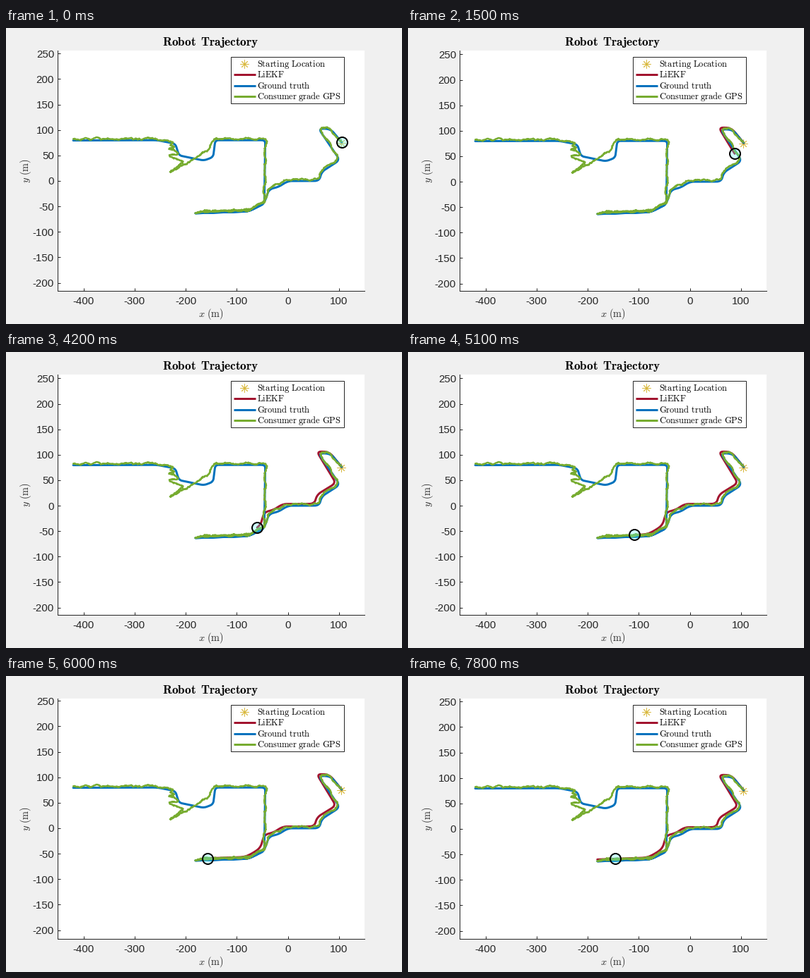
Recreate the animation shown at these times as a matplotlib script. Size 560x420 px, loop 8 s.

```python
import numpy as np
import matplotlib.pyplot as plt
from matplotlib.animation import FuncAnimation
from matplotlib.patches import Rectangle

W, H, DPI = 560, 420, 100
PT = 72 / DPI                       # points per pixel
SCALE, X0, Y0 = 0.7225, 398.5, 217  # pixels per metre, origin on the stage
LEFT, RIGHT, TOP, BOTTOM = 73, 507, 32, 373
INTERVAL, HOLD, POSES = 100, 3, 27  # each pose is held for three ticks
INK, RED, BLUE, GREEN, GOLD = "#262626", "#a2142f", "#0072bd", "#77ac30", "#d9b93f"

# Corners of the drive, in metres
OUT = [(105.5, 76), (84, 102), (60, 103), (102, 41), (66, 18), (62, 0), (0, 0),
       (-18, -12), (-37, -16), (-45, -42), (-62, -53), (-78, -60), (-181, -63.5)]
BACK = [OUT[-1], (-78, -60), (-46, -45), (-44, 80), (-142, 80)]
DIP = [(-146, 47), (-164, 40), (-213, 50), (-220, 73)]
HOME = [(-240, 77), (-256, 80), (-420, 79.5)]

# Where the robot is at a few poses
CHECKPOINTS = {0: OUT[0], 5: (92, 58), 10: (49, 0), 14: (-55, -50), 17: (-109, -54),
               20: (-158, -59), 22: OUT[-1], 23: OUT[-1], 26: (-147, -57)}


def travelled(p):
    return np.r_[0, np.cumsum(np.hypot(*np.diff(p, axis=0).T))]


def rounded(corners, radius):
    """Polyline with curved corners, sampled every metre."""
    p = np.array(corners, float)
    t = np.linspace(0, 1, 9)[:, None]
    parts = [p[:1]]
    for a, b, c in zip(p, p[1:], p[2:]):
        start, end = (b + (q - b) * min(radius / np.hypot(*(q - b)), 0.5) for q in (a, c))
        parts.append((1 - t) ** 2 * start + 2 * t * (1 - t) * b + t ** 2 * end)
    p = np.vstack(parts + [p[-1:]])
    d = travelled(p)
    s = np.linspace(0, d[-1], int(d[-1]) + 1)
    return np.column_stack([np.interp(s, d, p[:, 0]), np.interp(s, d, p[:, 1])])


def lost_signal(swings=8):
    """Dive off the road, then shrinking zigzags back up to it."""
    k = np.arange(swings)
    x = -232 + k % 2 * 32 * 0.84 ** k
    y = 13 + 60 * np.sqrt(k / (swings - 1))
    return [(-159, 54), *zip(x, y)]


def wander(n, seed=7):
    rng = np.random.default_rng(seed)
    slow = [np.convolve(rng.normal(0, 4, n), np.ones(12) / 12, "same") for _ in "xy"]
    return np.column_stack(slow) + rng.normal(0, 0.35, (n, 2))


out = rounded(OUT, 10)
truth = np.vstack([out, rounded(BACK + DIP + HOME, 7)])

gps = np.vstack([out, rounded(BACK + lost_signal() + HOME, 3)])
gps += wander(len(gps))
gps[:, 1] += 3 * np.clip(travelled(gps) / 150, 0, 1)

# The filter drifts sideways in mid-route and settles again at the turn
part = np.linspace(0, 1, len(out))
estimate = out + np.column_stack([-10 * np.sin(np.pi * part),
                                  3.5 * np.clip(part * 12, 0, 1)])

nearest = [np.hypot(*(estimate - p).T).argmin() for p in CHECKPOINTS.values()]
progress = np.interp(range(POSES), list(CHECKPOINTS), nearest).astype(int)


def view_shift(pose):
    """Vertical jump of the axes limits in pixels."""
    return 0 if pose < 2 else 1 if pose < 19 else -1 if pose < 25 else 0


plt.rcParams["font.family"] = "Liberation Sans"
fig = plt.figure(figsize=(W / DPI, H / DPI), dpi=DPI, facecolor="#f0f0f0")

ax = fig.add_axes([LEFT / W, 1 - BOTTOM / H, (RIGHT - LEFT) / W, (BOTTOM - TOP) / H])
ax.set_xlim((LEFT - X0) / SCALE, (RIGHT - X0) / SCALE)
ax.set_xticks(range(-400, 101, 100), [str(v) for v in range(-400, 101, 100)])
ax.set_yticks(range(-200, 251, 50), [str(v) for v in range(-200, 251, 50)])
ax.tick_params(direction="in", length=4 * PT, width=PT, color=INK,
               labelcolor=INK, labelsize=15 * PT)
ax.tick_params(axis="x", pad=8 * PT)
ax.tick_params(axis="y", pad=5 * PT)
ax.spines[["top", "right"]].set_visible(False)
ax.spines[["left", "bottom"]].set(color=INK, linewidth=PT)

star = dict(marker=(8, 2, 0), ms=12 * PT, mec=GOLD, mew=0.9 * PT, ls="none")
stroke = dict(solid_joinstyle="round", solid_capstyle="round")
ax.plot(104.5, 75, zorder=2, **star)
red_line, = ax.plot([], [], color=RED, lw=3 * PT, zorder=3, **stroke)
ax.plot(*truth.T, color=BLUE, lw=3 * PT, zorder=4, **stroke)
ax.plot(*gps.T, color=GREEN, lw=2.5 * PT, zorder=5, **stroke)
robot, = ax.plot([], [], "o", ms=15 * PT, mec="black", mew=2 * PT,
                 mfc=(0.4, 1, 1, 0.3), zorder=6)

# Titles and legend in stage pixels
stage = fig.add_axes([0, 0, 1, 1], xlim=(0, W), ylim=(H, 0))
stage.axis("off")


def label(x, y, tex, size, **kw):
    stage.text(x, y, f"${tex}$", fontsize=size * PT, math_fontfamily="cm", **kw)


label(289.5, 24.5, r"\mathbf{Robot\ \,Trajectory}", 17.3, ha="center", color="black")
label(289.5, 406, r"x\ \mathrm{(m)}", 14.3, ha="center", va="center", color=INK)
label(28.5, 203, r"y\ \mathrm{(m)}", 14.3, ha="center", va="center",
      rotation=90, color=INK)

stage.add_patch(Rectangle((317.5, 40.5), 160, 66, fc="white", ec=INK, lw=PT))
stage.plot(337, 51, **star)
for row, (name, color) in enumerate([(r"Starting\ Location", None), ("LiEKF", RED),
                                     (r"Ground\ truth", BLUE),
                                     (r"Consumer\ grade\ GPS", GREEN)]):
    y = 50.5 + 15.5 * row
    label(355, y + 4, rf"\mathrm{{{name}}}", 12.5, color="black")
    if color:
        stage.plot([322, 353], [y, y], color=color, lw=3 * PT, solid_capstyle="butt")


def draw(tick):
    pose = tick // HOLD
    red_line.set_data(*estimate[:progress[:pose + 1].max() + 1].T)
    robot.set_data(*estimate[progress[pose], :, None])
    base = Y0 + view_shift(pose)
    ax.set_ylim((base - BOTTOM) / SCALE, (base - TOP) / SCALE)
    return red_line, robot


animation = FuncAnimation(fig, draw, frames=80, interval=INTERVAL, repeat=True,
                          repeat_delay=0, blit=False)
plt.show()
```
